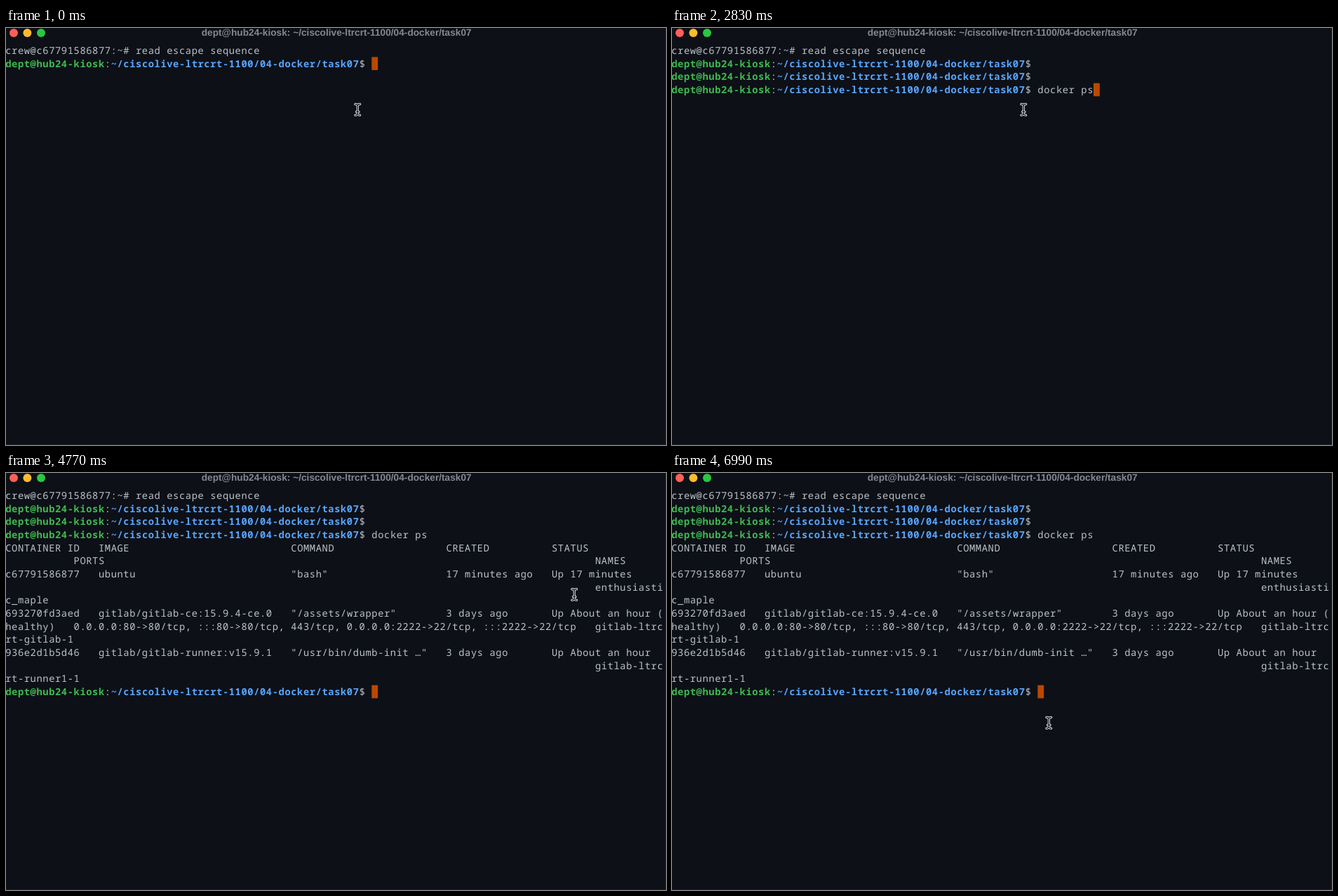
These frames come from a looping animation (941 by 595 pixels, 8 s). An HTML page:

```html
<!DOCTYPE html>
<html lang="en">
<head>
<meta charset="utf-8">
<title>Terminal</title>
<style>
  html, body { margin: 0; width: 100%; height: 100%; overflow: hidden; background: #0d1017; }
  svg { display: block; width: 941px; height: 595px; }
  text {
    font: 13.8px "Noto Sans Mono", "DejaVu Sans Mono", monospace;
    letter-spacing: calc(8.85px - .6em);
    white-space: pre;
    fill: #bcc2c9;
    text-rendering: geometricPrecision;
  }
  .user { fill: #3fb950; font-weight: 700; }
  .path { fill: #58a6ff; font-weight: 700; }
  .title {
    font: 700 13.7px "Liberation Sans", Arial, sans-serif;
    letter-spacing: 0;
    text-anchor: middle;
    fill: #85888e;
  }
  .picked rect { fill: #3b5070; }
  .picked text { fill: #f4f6f8; }
  #block { fill: #bb4800; }
  #mouse path { fill: none; stroke-linecap: round; stroke-linejoin: round; }
</style>
</head>
<body>
<svg id="stage" viewBox="0 0 941 595">
  <rect width="941" height="595" fill="#0d1017"/>
  <path d="M940.5 0V594.5H0" fill="none" stroke="#1b1f26"/>
  <circle cx="11" cy="7" r="6" fill="#ff5f57"/>
  <circle cx="30.4" cy="7" r="6" fill="#febc2e"/>
  <circle cx="50" cy="7" r="6" fill="#28c840"/>
  <text class="title" id="title" x="471.2" y="11"></text>
  <rect id="block" width="8.85" height="18.67"/>
  <g id="screen"></g>
  <g id="mouse">
    <path id="beam" stroke="#e4e6e8" stroke-width="3.2"
      d="M-3.4-7.8Q0-7.8 0-5V5Q0 7.8-3.4 7.8M3.4-7.8Q0-7.8 0-5M3.4 7.8Q0 7.8 0 5M-1.8 3H1.8"/>
    <path id="core" stroke="#08090c" stroke-width="1.2"/>
  </g>
</svg>
<script>
const NS = 'http://www.w3.org/2000/svg';
const LOOP = 8000, CELL = 8.85, ROW = 18.67, LEFT = -0.8, TOP = 22.7, BASE = 14.2;
const USER = 'dept@hub24-kiosk', DIR = '~/ciscolive-ltrcrt-1100/04-docker/task07';
const INPUT = USER.length + DIR.length + 3;
const NAME = ['enthusiasti', 'c_maple'];

const $ = id => document.getElementById(id);
const colX = col => LEFT + col * CELL;
const rowY = row => TOP + row * ROW;

function add(parent, tag, attrs = {}, text = '') {
  const el = document.createElementNS(NS, tag);
  for (const key in attrs) el.setAttribute(key, attrs[key]);
  el.textContent = text;
  return parent.appendChild(el);
}
const group = cls => add($('screen'), 'g', { class: cls });
const write = (parent, row, col, text, cls = '') =>
  add(parent, 'text', { x: colX(col), y: rowY(row) + BASE, class: cls }, text);

function prompt(row) {
  const g = group('prompt');
  write(g, row, 0, USER, 'user');
  write(g, row, USER.length, ':');
  write(g, row, USER.length + 1, DIR, 'path');
  write(g, row, INPUT - 2, '$');
  return g;
}

function select(parent, row, col, text) {
  add(parent, 'rect', {
    x: colX(col), y: rowY(row), width: text.length * CELL, height: ROW
  });
  write(parent, row, col, text);
}

$('title').textContent = USER + ': ' + DIR;
$('core').setAttribute('d', $('beam').getAttribute('d'));
write($('screen'), 0, 0, 'crew@c67791586877:~# read escape sequence');

const prompts = [1, 2, 3, 15].map(prompt);
const command = write($('screen'), 3, INPUT, '');

// Each row lists column and text pairs.
const table = [
  [0, 'CONTAINER ID', 15, 'IMAGE', 46, 'COMMAND', 71, 'CREATED', 88, 'STATUS'],
  [11, 'PORTS', 95, 'NAMES'],
  [0, 'c67791586877', 15, 'ubuntu', 46, '"bash"', 71, '17 minutes ago', 88, 'Up 17 minutes'],
  [95, NAME[0]],
  [0, NAME[1]],
  [0, '693270fd3aed', 15, 'gitlab/gitlab-ce:15.9.4-ce.0', 46, '"/assets/wrapper"',
    71, '3 days ago', 88, 'Up About an hour ('],
  [0, 'healthy)', 11, '0.0.0.0:80->80/tcp, :::80->80/tcp, 443/tcp, 0.0.0.0:2222->22/tcp, :::2222->22/tcp',
    95, 'gitlab-ltrc'],
  [0, 'rt-gitlab-1'],
  [0, '936e2d1b5d46', 15, 'gitlab/gitlab-runner:v15.9.1', 46, '"/usr/bin/dumb-init …"',
    71, '3 days ago', 88, 'Up About an hour'],
  [95, 'gitlab-ltrc'],
  [0, 'rt-runner1-1']
];
const output = group('output');
table.forEach((cells, i) => {
  for (let k = 0; k < cells.length; k += 2) write(output, 4 + i, cells[k], cells[k + 1]);
});

const picked = group('picked');
select(picked, 7, 95, NAME[0]);
select(picked, 8, 0, NAME[1]);

// Step tables: time, then the value held from that time on.
const lines = [[0, 1], [1200, 2], [1350, 3], [3120, 4]];
const typed = [[0, 0], [1790, 2], [1940, 4], [2090, 5], [2240, 7], [2680, 8], [2830, 9]];
const picking = [[0, 0], [5360, 1], [6850, 0]];
const moves = [
  [0, 501, 116],
  [3420, 425, 180], [3570, 290, 247], [3720, 180, 215], [3870, 136, 184],
  [4170, 190, 184], [4320, 370, 182], [4470, 570, 179], [4620, 730, 176],
  [4770, 810, 173], [4920, 830, 169], [5070, 838, 166], [5210, 842, 165],
  [5360, 843, 165], [5510, 868, 168], [5660, 908, 176], [5810, 936, 190],
  [5950, 850, 215], [6100, 727, 244], [6250, 635, 325], [6400, 565, 384],
  [6700, 550, 372], [6850, 540, 360], [6990, 537, 356]
];
const at = (steps, t) => steps.filter(s => s[0] <= t).pop();
const show = (el, on) => el.setAttribute('visibility', on ? 'visible' : 'hidden');

function draw(t) {
  const count = at(lines, t)[1], chars = at(typed, t)[1], done = count === 4;
  prompts.forEach((p, i) => show(p, i < count));
  command.textContent = 'docker ps'.slice(0, chars);
  show(output, done);
  show(picked, at(picking, t)[1]);
  $('block').setAttribute('x', colX(INPUT + (done ? 0 : chars)));
  $('block').setAttribute('y', rowY(done ? 15 : count));
  const [, x, y] = at(moves, t);
  $('mouse').setAttribute('transform', `translate(${x + .3} ${y + .5})`);
}

const start = performance.now();
function tick(now) {
  draw(Math.max(0, now - start) % LOOP);
  requestAnimationFrame(tick);
}
draw(0);
requestAnimationFrame(tick);
</script>
</body>
</html>
```
